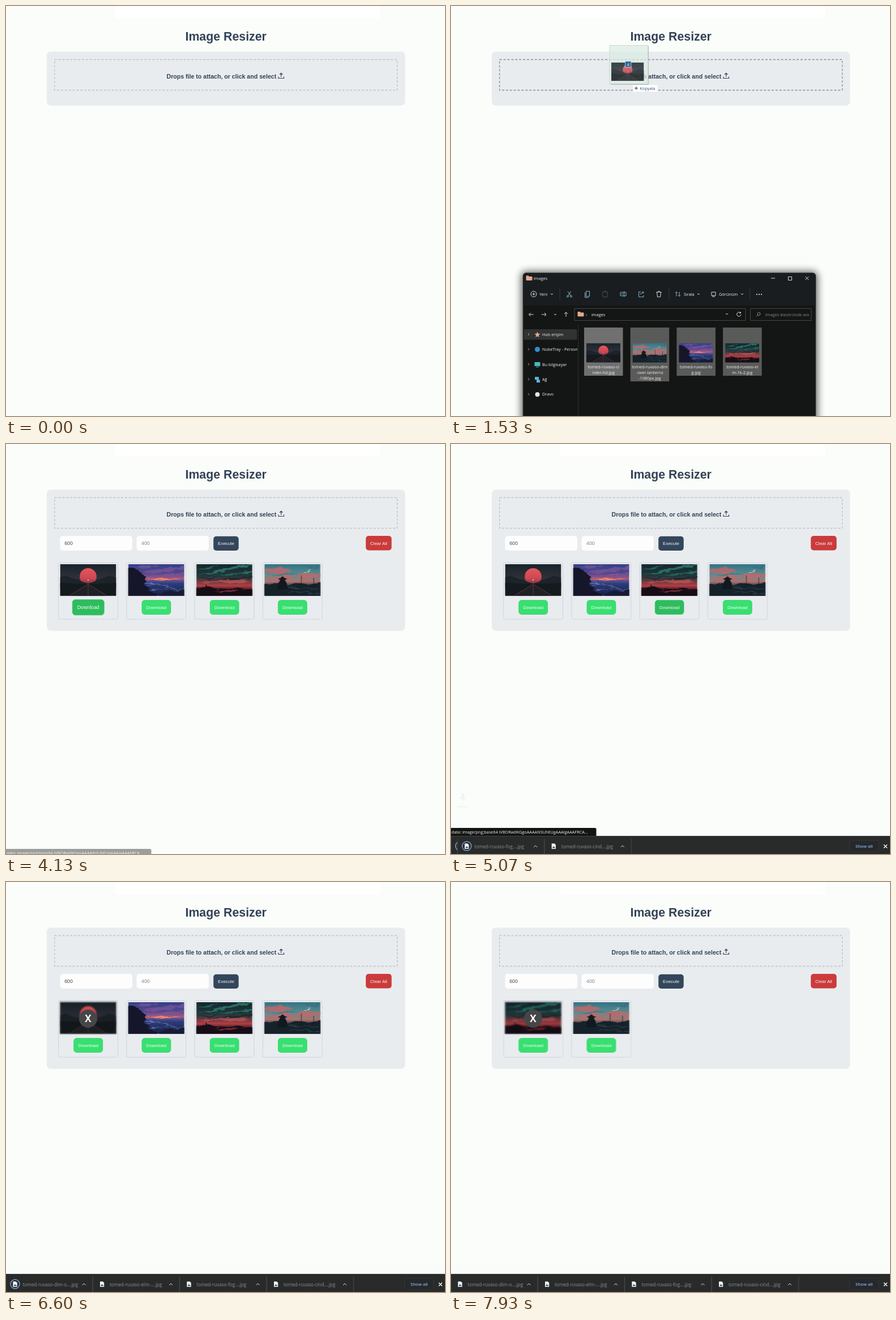
Write an HTML page that moves like this. It is 775 px wide and 723 px high and loops after 8 s.

```html
<!DOCTYPE html>
<html lang="en">
<head>
<meta charset="utf-8">
<title>Image Resizer</title>
<style>
  html, body { margin: 0; width: 100%; height: 100%; overflow: hidden; background: #fbfdfa; }
  svg { display: block; }
  #stage { position: absolute; left: 0; top: 0; }
  text { font-family: "Liberation Sans", Arial, sans-serif; }
  .ui text, text.ui { font-family: "Open Sans", "Noto Sans", sans-serif; font-size: 7.3px; fill: #f0f0f0; }
  .line { fill: none; stroke: #dcdcdc; stroke-width: 1; }
  .btn { transform-box: fill-box; transform-origin: center; }
  .btn text { font-size: 8px; fill: #f6f8f6; text-anchor: middle; }
  .field text { font-size: 8.9px; }
  .files text { text-anchor: middle; }
  #window { transform-origin: 386px 723px; }
  #remove {
    position: absolute; left: 95px; top: 211px; width: 100px; height: 57px;
    backdrop-filter: blur(1.3px) brightness(.9); box-shadow: 0 0 2px #555;
  }
  #remove b {
    position: absolute; left: 34px; top: 14px; width: 32px; height: 32px; border-radius: 50%;
    background: #464648; color: #fff; font: bold 17px/32px "Open Sans", sans-serif; text-align: center;
  }
</style>
</head>
<body>
<svg id="stage" width="775" height="723" viewBox="0 0 775 723">
  <defs>
    <linearGradient id="duskSky" x2="0" y2="1">
      <stop offset="0" stop-color="#34408a"/><stop offset=".3" stop-color="#54478e"/>
      <stop offset=".46" stop-color="#a85a82"/><stop offset=".52" stop-color="#5a5090"/>
      <stop offset=".62" stop-color="#2c3c7c"/><stop offset="1" stop-color="#181f3e"/>
    </linearGradient>
    <linearGradient id="auroraSky" x2="0" y2="1">
      <stop offset="0" stop-color="#14282e"/><stop offset=".38" stop-color="#21393d"/>
      <stop offset=".56" stop-color="#70383f"/><stop offset=".68" stop-color="#b43e46"/>
      <stop offset=".8" stop-color="#4c1e28"/><stop offset="1" stop-color="#120d12"/>
    </linearGradient>
    <linearGradient id="tealSky" x2="0" y2="1">
      <stop offset="0" stop-color="#337484"/><stop offset=".35" stop-color="#5c8e92"/>
      <stop offset=".55" stop-color="#b0706e"/><stop offset=".7" stop-color="#2a3f48"/><stop offset="1" stop-color="#14202a"/>
    </linearGradient>
    <linearGradient id="nightSky" x2="0" y2="1">
      <stop offset="0" stop-color="#18242b"/><stop offset=".45" stop-color="#30303a"/>
      <stop offset=".6" stop-color="#252a31"/><stop offset="1" stop-color="#12171b"/>
    </linearGradient>
    <linearGradient id="sun" x2="0" y2="1">
      <stop offset="0" stop-color="#e8555c"/><stop offset=".6" stop-color="#cc4852"/><stop offset="1" stop-color="#70343f"/>
    </linearGradient>
    <filter id="soft" x="-20%" y="-20%" width="140%" height="140%"><feGaussianBlur stdDeviation="7"/></filter>
    <filter id="glow" x="-20%" y="-30%" width="140%" height="160%"><feGaussianBlur stdDeviation="1.5"/></filter>
    <filter id="brush" x="0" y="0" width="100%" height="100%">
      <feTurbulence type="fractalNoise" baseFrequency=".06 .16" numOctaves="3" seed="4"/>
      <feDisplacementMap in="SourceGraphic" scale="9" xChannelSelector="R" yChannelSelector="G"/>
    </filter>
    <clipPath id="sideClip"><rect x="127" y="560" width="96" height="163"/></clipPath>
    <clipPath id="searchClip"><rect x="528" y="533" width="106" height="22"/></clipPath>

    <symbol id="road" viewBox="0 0 100 56" preserveAspectRatio="none">
      <rect width="100" height="56" fill="url(#nightSky)"/>
      <circle cx="50" cy="22" r="15" fill="url(#sun)"/>
      <path d="M0 23L10 20 22 25 33 28 42 32 50 34 58 32 67 28 78 24 88 20 100 24V42H0z" fill="#1c2329"/>
      <path d="M0 33L40 35H60L100 33V56H0z" fill="#141a1e"/>
      <path d="M49 36L16 56H84L51 36z" fill="#1f2126"/>
      <path d="M49 36L16 56M51 36L84 56M50 24V56" stroke="#8c4850" stroke-width=".6"/>
      <circle cx="50" cy="28" r="1.300" fill="#ff9c98"/>
    </symbol>
    <symbol id="coast" viewBox="0 0 100 56" preserveAspectRatio="none">
      <rect width="100" height="56" fill="url(#duskSky)"/>
      <g filter="url(#brush)">
        <path d="M26 12L100 4V8L45 16zM34 21L100 14V18zM5 4L60 2 30 7z" fill="#8a5c9c" opacity=".55"/>
        <path d="M32 27L60 25 95 27 60 29z" fill="#f08468"/>
        <path d="M30 36Q55 32 72 40T104 44" fill="none" stroke="#6c7cb4"/>
        <path d="M36 46Q60 41 100 50" fill="none" stroke="#5464a0" stroke-width="1.200"/>
        <path d="M-4 8L8 6 16 10 23 14 29 22 33 30 29 38 42 46 56 60H-4z" fill="#12152a"/>
        <path d="M48 60L64 48 80 50 104 45V60z" fill="#151a34"/>
      </g>
    </symbol>
    <symbol id="aurora" viewBox="0 0 100 56" preserveAspectRatio="none">
      <rect width="100" height="56" fill="url(#auroraSky)"/>
      <g filter="url(#brush)">
        <path d="M0 19L60 5 104-1V2L45 13zM20 23L104 11V14zM0 10L40 2 20 9z" fill="#34927f" opacity=".65"/>
        <path d="M30 28L104 20V24L40 31zM0 25L40 22 20 28z" fill="#16262c" opacity=".8"/>
        <path d="M0 32L50 28 104 30 60 33z" fill="#d4605a" opacity=".6"/>
        <path d="M-4 43L16 41 17 35 19 41 45 44 70 42 104 46V60H-4z" fill="#120d13"/>
        <path d="M28 47L55 46 85 48 55 49z" fill="#7c2c38"/>
      </g>
    </symbol>
    <symbol id="rails" viewBox="0 0 100 56" preserveAspectRatio="none">
      <rect width="100" height="56" fill="url(#tealSky)"/>
      <g filter="url(#brush)">
        <path d="M0 9L28 5 50 11 36 15 0 17zM48 20L78 14 104 18V22L70 26zM0 24L40 19 54 25 20 28z" fill="#c4666a" opacity=".8"/>
        <path d="M10 20L40 15 60 17 30 20zM70 6L100 3 90 9z" fill="#3c6c78" opacity=".7"/>
        <path d="M66 15L82 9 77 13 90 11z" fill="#a8e8dc"/>
        <path d="M-4 36L20 32 40 37 62 32 80 35 104 31V60H-4z" fill="#15222b"/>
        <path d="M40 42L104 44M44 48L104 53" stroke="#34505c" stroke-width=".8"/>
      </g>
      <path d="M24 44Q25 31 29 28L25 26 29 25Q32 19 36 25L40 26 36 28Q41 34 41 44zM66 20V40M88 24V40" fill="#101820" stroke="#101820" stroke-width=".8"/>
    </symbol>
    <g id="folder"><path d="M-5.500-3.500q0-1 1-1h3l1.500 1.500h4.500q1 0 1 1v5q0 1-1 1h-9q-1 0-1-1z" fill="#e5a78c"/></g>
    <path id="down" class="line" d="M-2-1L0 1 2-1"/>
  </defs>

  <rect x="193" width="467" height="22" fill="#fff"/>
  <text x="388.200" y="61.300" font-size="21.330" font-weight="bold" fill="#334357" text-anchor="middle">Image Resizer</text>
  <rect id="panel" x="72" y="80.500" width="632.500" height="95" rx="7" fill="#e9ecef"/>
  <rect id="drop" x="85.700" y="94.500" width="605" height="54" fill="none" stroke="#bcc1c7" stroke-width="1.330" stroke-dasharray="4 2.900"/>
  <text x="283.500" y="128" font-size="10.600" font-weight="bold" fill="#334357">Drops file to attach, or click and select</text>
  <path class="line" style="stroke:#334357;stroke-width:1.2" d="M485.700 125V118.500M483 121L485.700 118.300 488.400 121M481 124.500V127.500H490.500V124.500"/>

  <g data-show="1760">
    <g class="field">
      <rect data-show="2240-3080" x="95.500" y="162.500" width="128" height="27" rx="5" fill="#777" filter="url(#glow)"/>
      <rect x="95.500" y="162" width="127.500" height="26" rx="5" fill="#fcfdfc"/>
      <rect data-show="2240-3080" x="95.500" y="162" width="127.500" height="26" rx="5" fill="none" stroke="#777" stroke-width=".8"/>
      <rect x="230.500" y="162" width="127.500" height="26" rx="5" fill="#fcfdfc"/>
      <text data-show="0-2480" x="103.200" y="178.200" fill="#858585">600</text>
      <text data-show="2480-2600" x="103.200" y="178.200" fill="#4a4a4a">6</text>
      <text data-show="2600-2720" x="103.200" y="178.200" fill="#4a4a4a">60</text>
      <text data-show="2720" x="103.200" y="178.200" fill="#4a4a4a">600</text>
      <path id="caret" d="M103.500 170V180" stroke="#222" stroke-width=".8"/>
      <text x="239" y="178.200" fill="#858585">400</text>
    </g>
    <g id="execute" class="btn" fill="#33465b"><rect x="366.200" y="162.700" width="44.500" height="25.300" rx="5"/><text x="388.500" y="178">Execute</text></g>
    <g class="btn"><rect x="635.200" y="162" width="45.500" height="25.500" rx="5" fill="#cb3b3b"/><text x="658" y="177.500">Clear All</text></g>
    <g id="cells"></g>
  </g>

  <g id="window" class="ui">
    <rect x="124" y="468" width="523" height="270" rx="8" opacity=".62" filter="url(#soft)"/>
    <rect x="127" y="470.500" width="517" height="265" rx="6" fill="#141615" stroke="#48504a" stroke-width=".8"/>
    <path d="M127.500 528V476q0-5 5-5H638.500q5 0 5 5V528z" fill="#191d20"/>
    <use href="#folder" x="138" y="480"/><text x="146" y="483">images</text>
    <path class="line" d="M565 480H572M595.500 477.500h6v6h-6zM625.500 477L631.500 483M631.500 477L625.500 483"/>
    <circle class="line" cx="146" cy="508" r="5"/><path class="line" d="M143.500 508H148.500M146 505.500V510.500"/>
    <text x="156" y="511">Yeni</text>
    <text x="411" y="511">Sırala</text><text x="473" y="511">Görünüm</text>
    <use href="#down" x="178" y="508"/><use href="#down" x="437" y="508"/><use href="#down" x="514" y="508"/>
    <path d="M192 498V518M385 498V518M527.500 498V518" stroke="#34383a"/>
    <g class="line" style="stroke:#86b8cc">
      <path d="M206 503L211.500 511M212 503L206.500 511"/><circle cx="206" cy="512" r="1.500"/><circle cx="212" cy="512" r="1.500"/>
      <path d="M238.500 503h6v9h-6zM236.500 505V514H243"/>
      <path d="M268 504h8v9h-8zM270.500 502.500h3" opacity=".35"/>
      <path d="M299 505h10v6h-10zM305.500 503V513M301 508h3"/>
      <path d="M335 504H331.500V513H340V510M334 509Q335 505 340 505M338 503L340.500 505 338 507"/>
      <path d="M398 504V512M396 506L398 504 400 506M403 504V512M401 510L403 512 405 510"/>
    </g>
    <path class="line" d="M362.500 504.500H371.500M363.500 505L364.500 513H369.500L370.500 505M365.500 503H368.500M460 504.500h7v6h-7zM461 512.500H466"/>
    <g fill="#eee"><circle cx="540" cy="508.500" r="1.100"/><circle cx="544" cy="508.500" r="1.100"/><circle cx="548" cy="508.500" r="1.100"/></g>
    <path class="line" d="M145.500 544H137.500M140.500 541L137.500 544 140.500 547M160 544H168M165 541L168 544 165 547M203 548V540M200 543L203 540 206 543M511 541A3.700 3.700 0 1 0 512 544M511.500 539.500V541.500H509"/>
    <use href="#down" x="184" y="544"/><use href="#down" x="487" y="543"/>
    <path d="M218 533.500H520V554.500H218zM528.500 533.500H636V554.500H528.500z" fill="none" stroke="#454847"/>
    <use href="#folder" x="229" y="543.500"/><text x="238" y="546.500">›</text><text x="248" y="546.500">images</text>
    <circle class="line" cx="543.500" cy="543" r="2.500" opacity=".6"/><path class="line" d="M541.500 545L539 547.500" opacity=".6"/>
    <g clip-path="url(#searchClip)"><text x="555" y="546.500" style="fill:#858585">images klasöründe ara</text></g>
    <rect x="128.500" y="570" width="94" height="18.500" rx="2" fill="#303332"/>
    <path d="M224.500 562V723" stroke="#2c2f2e"/>
    <g id="side" clip-path="url(#sideClip)"></g>
    <path d="M152.500 574.500l1.500 3.300 3.500.3-2.700 2.400.8 3.500-3.100-1.800-3.100 1.800.8-3.500-2.700-2.400 3.500-.3z" fill="#e5a78c"/>
    <circle cx="152.500" cy="605.500" r="4.500" fill="#2f8fd0"/>
    <path d="M147.500 628h10v7h-10zM150 636h5v1h-5z" fill="#48b8c0"/>
    <path d="M148 654h7v5h-7zM151 659h6v5h-6z" fill="#5ab4d8"/>
    <circle cx="152.500" cy="685" r="4" fill="#e4e4e0"/>
    <g id="files" class="files"></g>
  </g>

  <g id="drag" class="ui">
    <rect x="280" y="69.500" width="68" height="68" fill="#dcebe4" fill-opacity=".72" stroke="#c4d2cc" stroke-width=".8"/>
    <path d="M348.300 71V138.300H282" fill="none" stroke="#aab4b0"/>
    <use href="#road" x="283" y="99.500" width="57.500" height="32.500" opacity=".85"/>
    <rect x="307.500" y="97.500" width="10.500" height="10.500" fill="#2c6a9c" stroke="#dce8f0" stroke-width=".7"/>
    <text x="312.800" y="105.600" text-anchor="middle">4</text>
    <g data-show="1130-1600">
      <rect x="321" y="139.500" width="43.500" height="11.500" fill="#fff"/>
      <path d="M324 145H330M327 142V148" stroke="#333"/>
      <text x="333.500" y="147.800" style="fill:#33507c">Kopyala</text>
    </g>
  </g>

  <g id="arrows"></g>
  <g id="status" class="ui">
    <path d="M0 677H254q2.500 0 2.500 2.500V691H0z" fill="#131515"/>
    <text x="1" y="686.800">data: image/png;base64 iVBORw0KGgoAAAANSUhEUgAAAlgAAAFRCA...</text>
  </g>
  <g id="shelf" class="ui">
    <rect y="691" width="775" height="40" fill="#292b2b"/>
    <g id="items"></g>
    <path d="M0 691.500H775" stroke="#3e4040"/>
    <rect x="703.500" y="699" width="51.500" height="20" rx="2.500" fill="#262829" stroke="#35383a"/>
    <text x="714" y="712" style="font-size:7.700px;font-weight:600;fill:#86acf0">Show all</text>
    <path class="line" style="stroke:#fff;stroke-width:1.400" d="M764 706.500L770 712.500M770 706.500L764 712.500"/>
  </g>
</svg>
<div id="remove"><b>X</b></div>

<script>
const LOOP = 8000;
const $ = id => document.getElementById(id);
const sheet = document.head.appendChild(document.createElement("style"));
let rules = "", count = 0;

// Turns [ms, css] stops into a looping keyframe rule.
function animate(el, stops, ease = "linear") {
  const name = "k" + count++;
  const all = [[0, stops[0][1]], ...stops, [LOOP, stops.at(-1)[1]]];
  rules += `@keyframes ${name}{${all.map(([ms, css]) => `${ms * 100 / LOOP}%{${css}}`).join("")}}\n`;
  el.style.animation = `${name} ${LOOP}ms ${ease} infinite`;
}
const step = (el, stops) => animate(el, stops, "step-end");
const show = (el, from, to) =>
  step(el, [[0, "opacity:0"], [from, "opacity:1"], ...(to ? [[to, "opacity:0"]] : [])]);
const move = (x, y, more = "") => `transform:translate(${x}px,${y}px) ${more}`;

const DROPPED = 1760, RESIZED = 3280, REMOVED = [6950, 7550];

// Thumbnail cells with their download buttons: hover, press, leave times.
const CELL = 120.2;
const cells = [
  ["road", 3950, 4200, 4310],
  ["coast", 4330, 4420, 4700],
  ["aurora", 4880, 5020, 5250],
  ["rails", 5600, 5870, 6100],
];
$("cells").innerHTML = cells.map(([scene], i) => `
  <g class="cell"><g transform="translate(${i * CELL})">
    <rect class="frame" x="92.700" y="209.500" width="104.800" height="63.500" rx="2" fill="none" stroke="#c0c5ca" stroke-dasharray="2.500 1.500"/>
    <use href="#${scene}" x="95.500" y="212" width="99" height="55.700"/>
    <g data-show="${RESIZED}"><g class="btn green"><rect x="119.700" y="275.500" width="51" height="25" rx="5" stroke="#30cc64" stroke-width=".7"/>
    <text x="145.200" y="290.800">Download</text></g></g>
  </g></g>`).join("");

document.querySelectorAll(".cell").forEach((cell, i) => {
  const slide = REMOVED.map((ms, n) => [ms, `opacity:${n >= i ? 0 : 1};${move(-CELL * (n + 1), 0)}`]);
  step(cell, [[0, "opacity:1;" + move(0, 0)], ...slide]);
});
document.querySelectorAll(".frame").forEach(f => step(f, [[0, "height:63.5px"], [RESIZED, "height:99.5px"]]));

function hover(el, fill, dark, enter, press, leave) {
  const idle = `transform:scale(1);fill:${fill}`;
  const over = `transform:scale(1.1);fill:${dark}`;
  const down = `transform:scale(1);fill:${dark}`;
  animate(el, [
    [enter, idle], [enter + 50, over], [press - 30, over], [press, down],
    [press + 60, down], [press + 80, over], [leave - 20, over], [leave, idle],
  ]);
}
document.querySelectorAll(".green").forEach((b, i) => hover(b, "#37e070", "#2ebd5e", ...cells[i].slice(1)));
hover($("execute"), "#33465b", "#2a3a4c", 3000, 3230, 3500);

// File browser contents
$("side").innerHTML = ["Hızlı erişim", "NubeTray - Personal", "Bu bilgisayar", "Ağ", "Dravo"].map((label, i) => {
  const y = 579 + i * 26.4;
  return `<path class="line" opacity=".7" d="M136 ${y - 2}l2 2-2 2"/><text x="161" y="${y + 2.8}">${label}</text>`;
}).join("");

$("files").innerHTML = [
  ["road", "tomed-ruvaso-ci", "nder-hd.jpg"],
  ["rails", "tomed-ruvaso-dim", "-over-lanterns", "-1080px.jpg"],
  ["coast", "tomed-ruvaso-fo", "g.jpg"],
  ["aurora", "tomed-ruvaso-el", "m-1k-2.jpg"],
].map(([scene, ...lines], i) => {
  const x = 235 + i * 81.7;
  return `<rect x="${x}" y="567" width="68.500" height="${65 + lines.length * 10}" fill="${i ? "#5a5b59" : "#707070"}"/>
    <use href="#${scene}" x="${x + 4}" y="594.500" width="60" height="34"/>` +
    lines.map((line, n) => `<text x="${x + 34.2}" y="${638.5 + n * 10}">${line}</text>`).join("");
}).join("");

// Download shelf: the newest item is uncovered as older ones slide right.
const SLOT = 153.5, GROW = 300;
const downloads = [["cind", 4250], ["fog", 4450], ["elm-", 5048], ["dim-o", 5900]];
$("items").innerHTML = downloads.map(([label]) => `
  <g class="item">
    <rect y="692" width="${SLOT}" height="31" fill="#292b2b"/>
    <path d="M-.3 696V723M${SLOT - .3} 696V723" stroke="#4c4e4e"/>
    <circle class="ring" cx="16" cy="709" r="8" fill="none" stroke="#7d9bd0" stroke-width="1.500"/>
    <path d="M12.300 704.500H17.500L19.700 706.700V714H12.300z" fill="#f2f4f6"/>
    <path d="M13.500 712.500L15.500 709 17 711 17.800 710 18.700 712.500z" fill="#33506c"/>
    <text x="29.500" y="712.800" style="font-size:8.100px;fill:#8c8e8e">tomed-ruvaso-${label}....jpg</text>
    <path class="line" stroke-width="1.300" d="M134.500 711L137.500 708 140.500 711"/>
  </g>`).reverse().join("");

[...document.querySelectorAll(".item")].reverse().forEach((item, i) => {
  const start = downloads[i][1];
  const stops = [[0, move(0, 0)]];
  downloads.slice(i + 1).forEach(([, ms], n) =>
    stops.push([ms, move(SLOT * n, 0)], [ms + GROW, move(SLOT * (n + 1), 0)]));
  animate(item, stops);
  animate(item.querySelector(".ring"), [[start + 720, "opacity:1"], [start + 810, "opacity:0"]]);
});

$("arrows").innerHTML = downloads.map(() =>
  `<path class="arrow" d="M19 613h4v6h4l-6 6-6-6h4zM11 635h20v2H11z" fill="#6f8fdc"/>`).join("");
document.querySelectorAll(".arrow").forEach((arrow, i) => {
  const start = downloads[i][1] - 15;
  animate(arrow, [
    [start, "opacity:0;" + move(0, 0)], [start + 300, "opacity:.7;" + move(0, 28)], [start + 600, "opacity:0;" + move(0, 56)],
  ]);
});

animate($("shelf"), [[4250, move(0, 33)], [4400, move(0, 0)]]);
animate($("status"), [
  [4060, "opacity:0;" + move(0, 42)], [4130, "opacity:.4;" + move(0, 37)], [4200, "opacity:1;" + move(0, 32)],
  [4250, "opacity:1;" + move(0, 32)], [4400, "opacity:1;" + move(0, 0)],
  [6100, "opacity:1;" + move(0, 0)], [6200, "opacity:0;" + move(0, 0)],
]);

animate($("window"), [
  [270, "opacity:0;" + move(0, 40, "scale(.92)")], [480, "opacity:1;" + move(0, 0, "scale(1)")],
  [1640, "opacity:1;" + move(0, 0, "scale(1)")], [1840, "opacity:0;" + move(0, 50, "scale(.92)")],
], "ease-out");
animate($("drag"), [
  [670, "opacity:0;" + move(-44, 490)], [690, "opacity:1;" + move(-44, 490)], [1070, "opacity:1;" + move(-4, 58)],
  [1220, "opacity:1;" + move(0, 0)], [1600, "opacity:1;" + move(0, 0)], [1601, "opacity:0;" + move(0, 0)],
]);
step($("drop"), [[0, "stroke:#bcc1c7"], [1130, "stroke:#878d93"], [1600, "stroke:#bcc1c7"]]);
step($("panel"), [[0, "height:95px"], [DROPPED, "height:213.5px"], [RESIZED, "height:249px"]]);
step($("caret"), [
  [0, "opacity:0"], [2240, "opacity:1;" + move(0, 0)], [2480, "opacity:1;" + move(5, 0)],
  [2600, "opacity:1;" + move(10, 0)], [2720, "opacity:1;" + move(15, 0)], [3080, "opacity:0;" + move(15, 0)],
]);
show($("remove"), 6400);
document.querySelectorAll("[data-show]").forEach(el => show(el, ...el.dataset.show.split("-").map(Number)));

sheet.textContent = rules;
</script>
</body>
</html>
```
